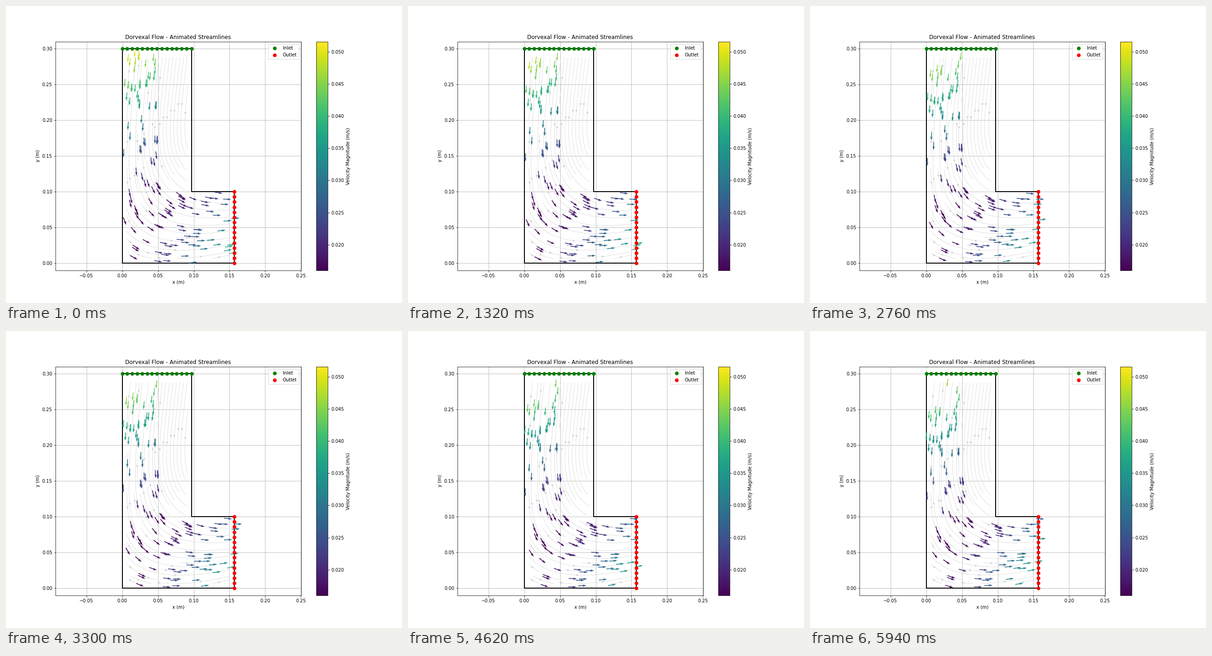
Animation of 864x648 px, one loop 6000 ms. Source, as a matplotlib script:

```python
import numpy as np
import matplotlib.pyplot as plt
from matplotlib.animation import FuncAnimation

FRAMES = 100
INTERVAL = 60
DT = 0.01
WIDTH, HEIGHT = 0.157, 0.3
NECK, STEP = 0.097, 0.1    # column width, outlet height
MARGIN = 0.0065            # gap between walls and streamlines


def velocity(x, y):
    """Downward flow that slows, bends to the right and speeds up again."""
    shear = 0.175 / (1 + np.exp((y - 0.155) / 0.02))
    u = 0.0125 * np.exp(-(y / 0.075) ** 2) - 0.06 * y ** 2 + shear * x
    v = -0.008 - 0.1 * y - 0.15 * y ** 2 + 0.12 * x
    return u, v


def seed_tracers(column=56, basin=74):
    """Scatter tracers in the column and basin; a few enter at the inlet later."""
    rng = np.random.default_rng(4)
    late = np.arange(20, FRAMES, 25)
    x = np.concatenate([rng.uniform(0, 0.05, column),
                        rng.uniform(0, WIDTH, basin),
                        rng.uniform(0.02, 0.05, late.size)])
    y = np.concatenate([rng.uniform(STEP, HEIGHT, column),
                        rng.uniform(0, STEP, basin),
                        np.full(late.size, 0.295)])
    birth = np.concatenate([np.zeros(column + basin), late])
    return x, y, birth


def trace():
    """Return tracer positions per frame, NaN where a tracer is absent."""
    x, y, birth = seed_tracers()
    history = []
    for frame in range(FRAMES):
        active = (birth <= frame) & (x >= 0) & (x <= WIDTH) & (y >= 0)
        shown = np.where(active, 1, np.nan)
        history.append((x * shown, y * shown))
        u, v = velocity(x, y)
        x = x + u * DT * active
        y = y + v * DT * active
    return history


def arrows(frame):
    x, y = paths[frame]
    u, v = velocity(x, y)
    speed = np.hypot(u, v)
    return np.nan_to_num(np.column_stack([x, y])), u / speed, v / speed, speed


def draw_streamlines(ax):
    gx = np.linspace(MARGIN, WIDTH - MARGIN, 60)
    gy = np.linspace(MARGIN, HEIGHT - 0.012, 100)
    x, y = np.meshgrid(gx, gy)
    u, v = velocity(x, y)
    solid = (x > NECK - MARGIN / 2) & (y > STEP - MARGIN)
    u[solid] = np.nan
    v[solid] = np.nan
    ax.streamplot(gx, gy, u, v, color="lightgray", linewidth=0.7)


def draw_vessel(ax):
    ax.plot([0, 0, WIDTH, WIDTH, NECK, NECK, 0],
            [HEIGHT, 0, 0, STEP, STEP, HEIGHT, HEIGHT], "k-", lw=2)
    ax.scatter(np.linspace(0, NECK, 15), np.full(15, HEIGHT), s=50,
               color="green", label="Inlet", zorder=5)
    ax.scatter(np.full(15, WIDTH), np.linspace(0, STEP, 15), s=50,
               color="red", label="Outlet", zorder=5)


paths = trace()

fig, ax = plt.subplots(figsize=(12, 9), dpi=72)
draw_streamlines(ax)
draw_vessel(ax)

pos, u, v, speed = arrows(0)
quiver = ax.quiver(pos[:, 0], pos[:, 1], u, v, speed, cmap="viridis",
                   scale=30, width=0.003, zorder=3)
quiver.set_clim(0.016, 0.0516)
fig.colorbar(quiver, ax=ax, label="Velocity Magnitude (m/s)")

# Equal scales on both axes, vessel in the middle
box = ax.get_window_extent()
half = 0.16 * box.width / box.height
ax.set_xlim(0.0784 - half, 0.0784 + half)
ax.set_ylim(-0.01, 0.31)
ax.set_xlabel("x (m)")
ax.set_ylabel("y (m)")
ax.set_title("Dorvexal Flow - Animated Streamlines")
ax.grid(True)
ax.legend(loc="upper right")


def update(frame):
    pos, u, v, speed = arrows(frame)
    quiver.set_offsets(pos)
    quiver.set_UVC(u, v, speed)
    return (quiver,)


anim = FuncAnimation(fig, update, frames=FRAMES, interval=INTERVAL,
                     repeat=True, repeat_delay=0)
plt.show()
```
